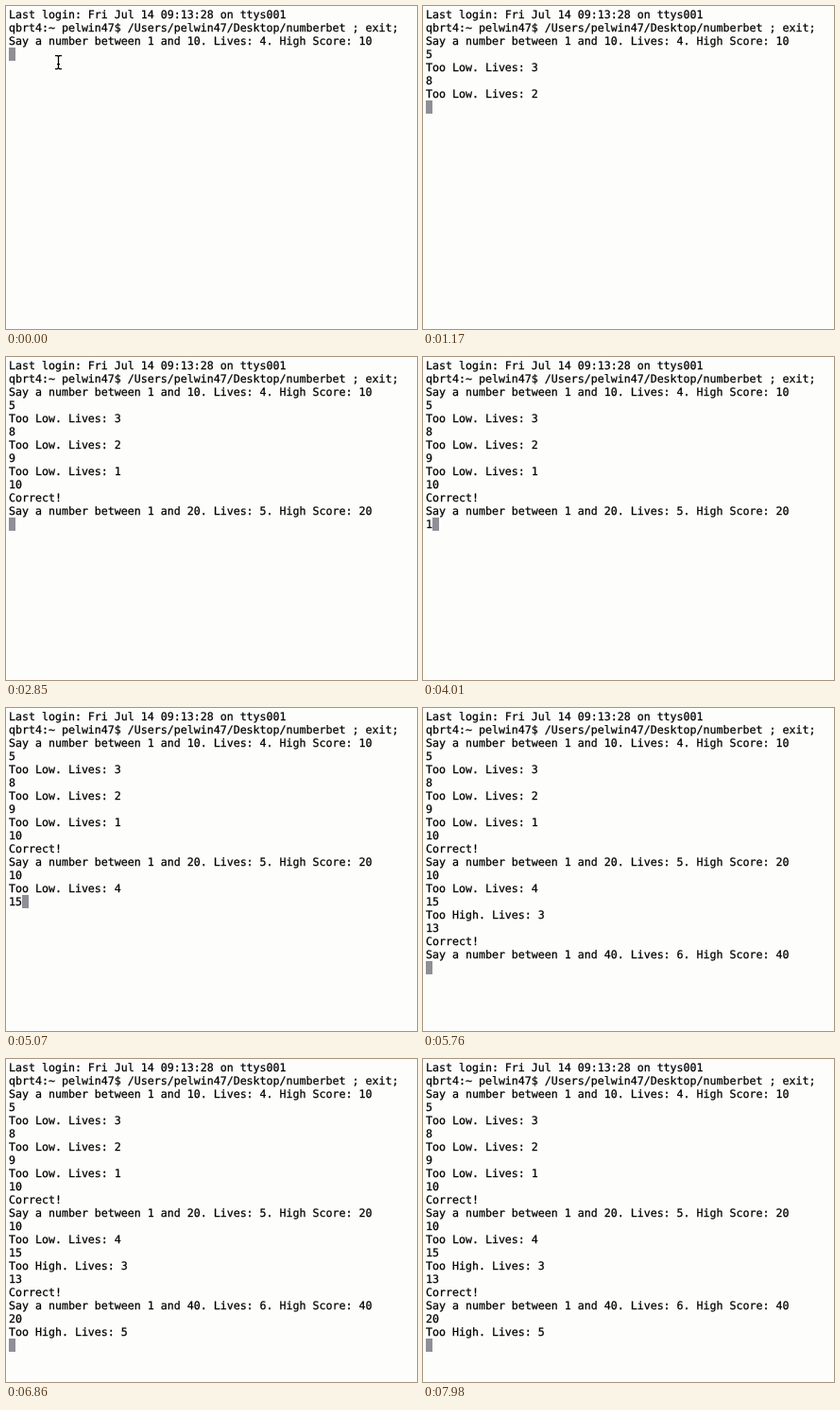
Animation of 435x342 px, one loop 8 s. Source, as an HTML page:

```html
<!DOCTYPE html>
<html lang="en">
<head>
<meta charset="utf-8">
<title>Number game in a terminal</title>
<style>
  html, body {
    margin: 0;
    width: 100%;
    height: 100%;
    overflow: hidden;
    background: #fdfdfc;
  }
  pre {
    position: absolute;
    left: 3px;
    top: 2px;
    margin: 0;
    color: #000;
    font: 11.627px/14px "DejaVu Sans Mono", monospace; /* 7px per column */
    font-variant-ligatures: none;
    text-rendering: geometricPrecision;
    -webkit-text-stroke: .25px #000;
  }
  #caret {
    display: inline-block;
    width: 7px;
    height: 14px;
    vertical-align: top;
    background: #908e96;
  }
  #beam {
    position: absolute;
    left: 51px;
    top: 51px;
    fill: none;
    stroke: #000;
    stroke-width: 1.25;
  }
</style>
</head>
<body>
<pre><span id="out"></span><span id="caret"></span></pre>
<svg id="beam" width="9" height="17"><path d="M1 1.5H3.5L4.5 2.5L5.5 1.5H8M4.5 2V15M1 15.5H3.5L4.5 14.5L5.5 15.5H8M3 10.5H6"/></svg>
<script>
const LOOP = 8000;
const out = document.getElementById('out');
const beam = document.getElementById('beam');

const ask = (max, lives) =>
  `Say a number between 1 and ${max}. Lives: ${lives}. High Score: ${max}\n`;
const miss = (side, lives) => `\nToo ${side}. Lives: ${lives}\n`;
const win = (max, lives) => '\nCorrect!\n' + ask(max, lives);

const intro = 'Last login: Fri Jul 14 09:13:28 on ttys001\n' +
  'qbrt4:~ pelwin47$ /Users/pelwin47/Desktop/numberbet ; exit;\n' +
  ask(10, 4);

// [time in ms, text added]
const steps = [
  [0, intro],
  [100, '5'], [350, miss('Low', 3)],
  [980, '8'], [1140, miss('Low', 2)],
  [1520, '9'], [2080, miss('Low', 1)],
  [2350, '1'], [2570, '0'], [2680, win(20, 5)],
  [4010, '1'], [4110, '0'], [4350, miss('Low', 4)],
  [4970, '1'], [5050, '5'], [5150, miss('High', 3)],
  [5380, '1'], [5500, '3'], [5670, win(40, 6)],
  [6480, '2'], [6580, '0'], [6740, miss('High', 5)]
];

let shown = 0;
function draw() {
  const t = performance.now() % LOOP;
  const due = steps.filter(([at]) => at <= t);
  if (due.length !== shown) {
    shown = due.length;
    out.textContent = due.map(([, text]) => text).join('');
    beam.style.display = shown > 1 ? 'none' : 'block';
  }
  requestAnimationFrame(draw);
}
draw();
</script>
</body>
</html>
```
